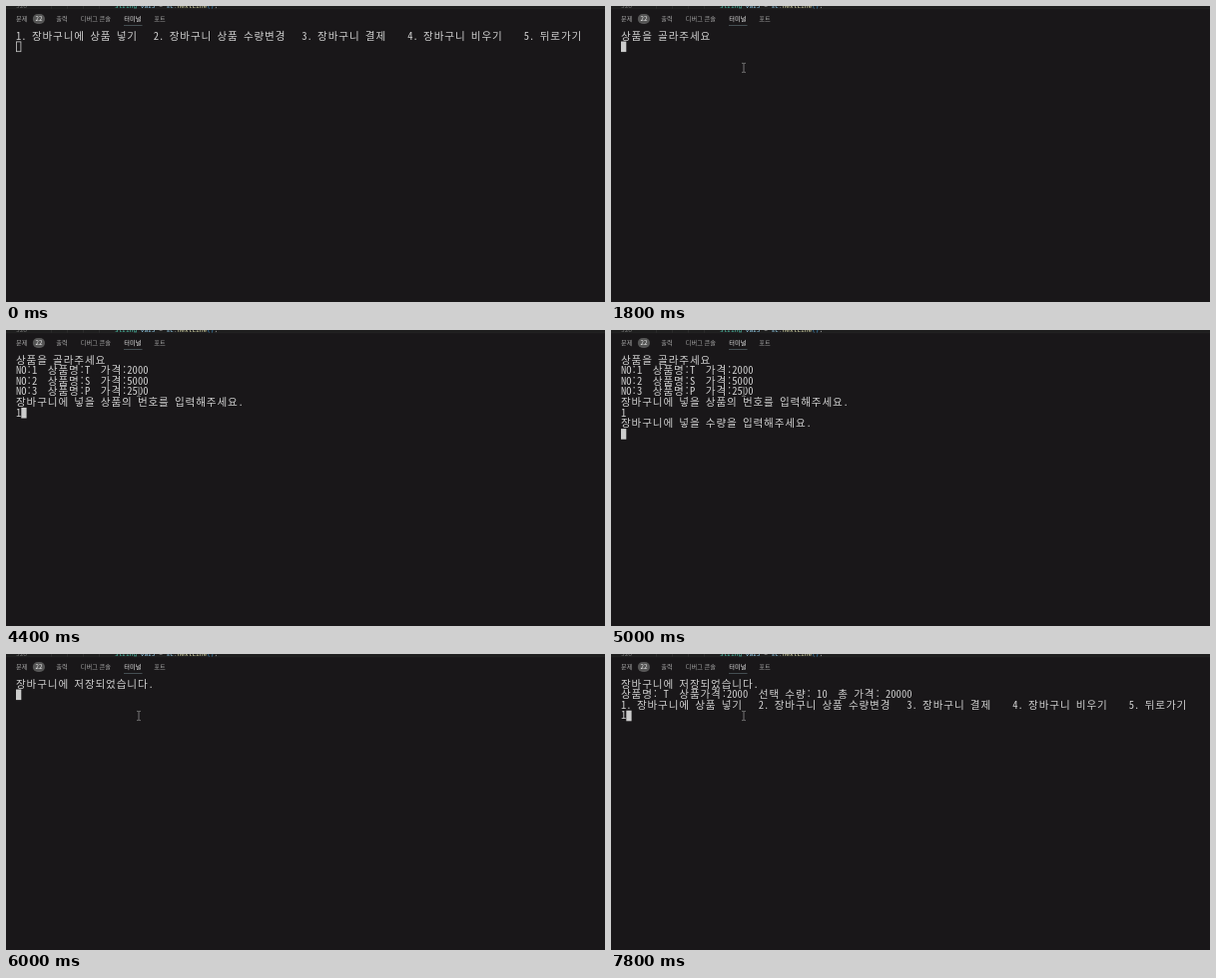
These frames come from a looping animation (600x297 px, 8 s). An HTML page:

```html
<!DOCTYPE html>
<html lang="ko">
<head>
<meta charset="utf-8">
<title>Terminal</title>
<style>
  html, body { margin: 0; width: 100%; height: 100%; overflow: hidden; background: #191719; }
  svg { display: block; width: 100%; height: 100%; }
  text { white-space: pre; }
  .term { font: 10.6px 'Noto Sans Mono CJK KR', 'Noto Sans CJK KR', 'Noto Sans CJK', monospace; fill: #d0d0d0; }
  .tab { font: 6.2px 'Noto Sans CJK KR', 'Noto Sans CJK', sans-serif; fill: #a6a6a6; }
  .code { font: 6.15px 'Noto Sans Mono', 'DejaVu Sans Mono', monospace; fill: #c8c8c8; }
  #beam { mix-blend-mode: difference; }
</style>
</head>
<body>
<svg viewBox="0 0 600 297">
  <rect width="600" height="297" fill="#1e1e1e"/>
  <path d="M45.5 0V3M61.5 0V3M77.5 0V3M93.5 0V3" stroke="#353535" stroke-width=".6"/>
  <text class="code" x="10" y="2.4" style="fill:#777">526</text>
  <text class="code" x="109" y="2.4"><tspan fill="#4ec9b0">String</tspan> <tspan fill="#9cdcfe">var5</tspan> = <tspan fill="#9cdcfe">sc</tspan>.<tspan fill="#dcdcaa">nextLine</tspan><tspan fill="#3f9fe0">()</tspan>;</text>
  <rect y="3" width="600" height="294" fill="#191719"/>
  <rect y="2.6" width="600" height=".6" fill="#272627"/>
  <g class="tab">
    <text x="10" y="15">문제</text>
    <rect x="26.8" y="8" width="12.2" height="10" rx="5" fill="#555555"/>
    <text x="32.9" y="15" text-anchor="middle" style="fill:#f0f0f0">22</text>
    <text x="50.3" y="15">출력</text>
    <text x="74.8" y="15">디버그 콘솔</text>
    <text x="118.3" y="15" style="fill:#ececec">터미널</text>
    <text x="148.3" y="15">포트</text>
    <rect x="118" y="19" width="18.5" height=".7" fill="#56676c"/>
  </g>
  <g id="rows" class="term"></g>
  <rect id="caret"/>
  <path id="beam" d="M-1.9 -4.6H-.6L0 -4L.6 -4.6H1.9M0 -4V4M-1.9 4.6H-.6L0 4L.6 4.6H1.9" fill="none" stroke="#a8a8a8" stroke-width=".8"/>
</svg>
<script>
const LOOP = 8000, LEFT = 10, TOP = 24.9, COL = 5.3, ROW = 10.6, BASE = 8.7;
const $ = id => document.getElementById(id);

const menu = '1. 장바구니에 상품 넣기   2. 장바구니 상품 수량변경   3. 장바구니 결제    4. 장바구니 비우기    5. 뒤로가기';
const pick = '상품을 골라주세요';
const list = [
  pick,
  'NO:1  상품명:T  가격:2000',
  'NO:2  상품명:S  가격:5000',
  'NO:3  상품명:P  가격:2500',
  '장바구니에 넣을 상품의 번호를 입력해주세요.'
];
const amount = [...list, '1', '장바구니에 넣을 수량을 입력해주세요.'];
const saved = '장바구니에 저장되었습니다.';
const receipt = [saved, '상품명: T  상품가격:2000  선택 수량: 10  총 가격: 20000', menu];

// The last line of each screen is the input line; the caret sits at its end.
const screens = [
  [0, [menu, '']],
  [1600, [menu, '1']],
  [1800, [pick, '']],
  [2000, [...list, '']],
  [4400, [...list, '1']],
  [4600, [...amount, '']],
  [5600, [...amount, '1']],
  [5800, [...amount, '10']],
  [6000, [saved, '']],
  [6200, [...receipt, '']],
  [7800, [...receipt, '1']]
];
const mouse = [[0, null], [200, [317, 155]], [400, [130, 73]], [600, [133, 62]]];

const at = (steps, t) => steps.filter(s => s[0] <= t).pop()[1];
const cells = ch => ch >= '가' && ch <= '힣' ? 2 : 1;

function set(el, attrs) {
  for (const key in attrs) el.setAttribute(key, attrs[key]);
}

function drawLine(line, row) {
  const el = document.createElementNS('http://www.w3.org/2000/svg', 'text');
  let col = 0;
  const xs = [...line].map(ch => {
    const x = LEFT + col * COL;
    col += cells(ch);
    return x.toFixed(1);
  });
  set(el, { x: xs.join(' '), y: TOP + row * ROW + BASE });
  el.textContent = line;
  return el;
}

let shown = null;
function render(t) {
  const lines = at(screens, t);
  if (lines !== shown) {
    $('rows').replaceChildren(...lines.map(drawLine));
    shown = lines;
  }

  const row = lines.length - 1;
  const x = LEFT + lines[row].length * COL, y = TOP + row * ROW;
  const focused = t >= 600;
  const inset = focused ? 0 : 0.4;
  set($('caret'), {
    x: x + inset, y: y + inset,
    width: COL - 2 * inset, height: ROW - 2 * inset,
    fill: focused ? '#cccccc' : 'none',
    stroke: focused ? 'none' : '#cccccc',
    'stroke-width': 0.8
  });

  const pos = at(mouse, t);
  set($('beam'), pos
    ? { visibility: 'visible', transform: `translate(${pos})` }
    : { visibility: 'hidden' });
}

const start = performance.now();
function tick() {
  render((performance.now() - start) % LOOP);
  requestAnimationFrame(tick);
}
tick();
</script>
</body>
</html>
```
